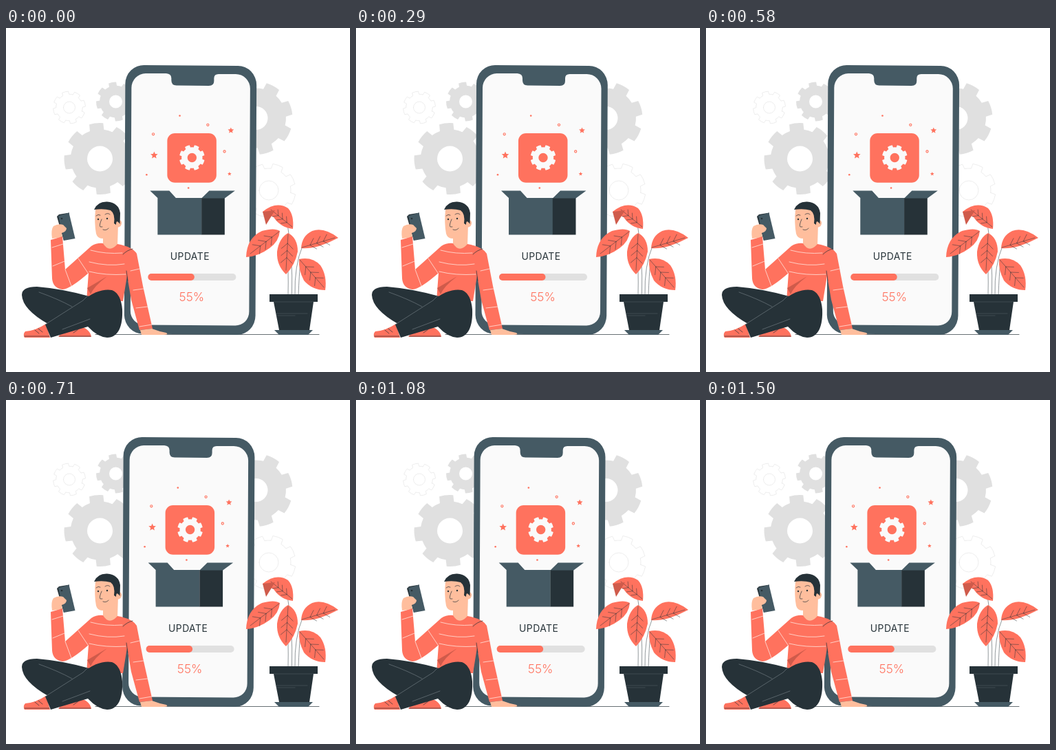
An HTML page that plays this animation: 500x500 px, repeating every 1.54 s.

```html
<!DOCTYPE html>
<html lang="en">
<head>
<meta charset="utf-8">
<title>Update</title>
<style>
  html, body { margin: 0; height: 100%; overflow: hidden; background: #fff; }
  svg { display: block; width: 100vw; height: 100vh; }
  path { stroke-linecap: round; stroke-linejoin: round; }
  text { font-family: Inter, "Open Sans", sans-serif; text-anchor: middle; }
  .coral { fill: #ff725e; }
  .slate { fill: #455a64; }
  .dark { fill: #263238; }
  .grey { fill: #e0e0e0; }
  .skin { fill: #ffbe9d; }
  .shade { fill: #cf5b4b; }
  .ink { fill: none; stroke: #263238; stroke-width: .7; }
  .pale { fill: none; stroke: #ffd8d0; stroke-width: .9; }
  .seam { fill: none; stroke: #8b959a; stroke-width: .5; }
  .stem { fill: none; stroke: #263238; stroke-width: .5; }
  .ring { fill: none; stroke: #ff725e; stroke-width: 1.1; }
  .faint { fill: none; stroke: #e6e6e6; stroke-width: .7; }
</style>
</head>
<body>
<svg viewBox="0 0 500 500">
  <g id="gears"></g>
  <path class="ink" d="M130 445.5H455"/>

  <g id="phone">
    <path class="slate" d="M201.500 54L337 55A27 28 0 0 1 364.300 83L362.700 418A27 28 0 0 1 336 446L199 444.500A27 28 0 0 1 172 417L173.500 81A27 27 0 0 1 201.500 54Z"/>
    <path fill="#fafafa" d="M203 66H233Q240.500 66.500 240.500 73V76Q240.500 83.500 248 83.500L295 84Q302.500 84 302.500 77V73Q302.500 67 309 67H334A21 21 0 0 1 355 88L353.500 412A20 20 0 0 1 333 432.500L201 431.500A20 20 0 0 1 181 411L182.500 87A21 21 0 0 1 203 66Z"/>
    <rect class="coral" x="234.500" y="153" width="71.500" height="71.700" rx="11"/>
    <g id="sparks"></g>
    <path class="slate" d="M220.500 247H284.500V300.500H220.500ZM209.500 236.500H237.500L247.500 247.500H221Z"/>
    <path class="dark" d="M284.300 247H318V300.500H284.300Z"/>
    <path class="slate" d="M295.500 236.500H333L318 247.500H284.300Z"/>
    <text class="dark" x="267.500" y="337" font-size="13.900" letter-spacing=".45">UPDATE</text>
    <rect class="grey" x="206.500" y="357" width="128" height="10" rx="5"/>
    <rect class="coral" x="206.500" y="357" width="67.500" height="10" rx="5"/>
    <text class="coral" x="270" y="397" font-size="17.500" font-weight="300">55%</text>
  </g>

  <g id="plant">
    <path class="stem" d="M410 388Q411 350 408 325M415.500 388Q417 330 409 285M420 388Q419 345 431 317M425 388Q426 360 428 338"/>
    <g id="leaves"></g>
    <path class="shade" d="M373 267L391 265L378 286Z"/>
    <path class="slate" d="M390 439H446L439 446H397Z"/>
    <path class="dark" d="M383 387H453V398H447L441 439H397L389 398H383Z"/>
    <path class="seam" d="M389 398H447M392 415H438M393 418H420" stroke-opacity=".5"/>
  </g>

  <g id="man">
    <path class="skin" d="M141 302L163 284L162 317Q152 328 141 315Z"/>
    <path class="skin" d="M130 264Q128 283 131 299Q133 306 140 306Q154 304 161 290Q169 289 168 282Q166 277 161 280L157 260H133Z"/>
    <path class="dark" d="M128 264Q133 252 147 252.500Q164 254 166 269L165.500 285Q160 277 160 286L157 284Q159 270 152 265Q142 262 128 264Z"/>
    <path class="ink" d="M139 278Q135 287 137 289L140 289M141 293Q146 295 149 291M131 273Q134 270 137 272M144 271Q148 268 151 271"/>
    <circle class="dark" cx="134" cy="278" r="1.200"/>
    <circle class="dark" cx="147" cy="277" r="1.200"/>

    <path class="dark" d="M74 274L77 271L92 268.500L84 309Z"/>
    <path class="slate" d="M76 273L91.500 268.500L100.500 306L84 309Z"/>
    <circle class="dark" cx="81" cy="277" r="1.300"/>
    <path class="skin" d="M67 306Q65 293 69 288Q76 284 83 286L88 291Q88 296 81 298L82 304Z"/>

    <path class="coral" d="M65 308L82 303L86 351L124 317Q132 312 141 313Q150 328 162 314Q184 318 190 328L199 375L213 437L194 439L182 395L176 360L170 397H117L120 356Q94 379 82 380Q68 378 67 364Z"/>
    <path class="shade" d="M147 361L118 378L123 387Q128 375 147 361Z"/>
    <path class="pale" d="M67 319L83 314M68 346L85 339M86 351L95 375M105 335L119 356M123 323Q145 329 169 327M121 340Q148 347 172 343M121 354Q145 360 174 358M181 353L194 350M185 381L200 379M189 407L206 405M194 434L212 431"/>
    <path class="ink" d="M170 329Q176 323 184 321M175 353L177 367"/>

    <path class="skin" d="M195 439L212 437Q222 441 233 443Q237 446 229 446H197Z"/>
    <path class="coral" d="M78 446L106 432L116 437Q123 442 124 449H76Z"/>
    <path class="coral" d="M58 430Q43 440 28 441Q24 445 27 450H64Z"/>
    <path class="ink" d="M27 448H63M78 448H123M42 439L48 444M47 437L53 442M105 438L98 443"/>
    <path class="dark" d="M23 388Q23 376 45 376Q82 379 121 390L114 412L120 432L100 430L61 430Q24 409 23 388Z"/>
    <path class="dark" d="M57 431L112 396Q134 378 154 381Q167 386 169 409C170 432 164 450 147 450Q133 449 119 434L65 450Z"/>
    <path class="seam" d="M48 384Q76 394 96 405M57 431L112 396L119 389M82 438L122 423"/>
  </g>
</svg>
<script>
const $ = id => document.getElementById(id);
const polar = (cx, cy, r, a) => `${(cx + r * Math.cos(a)).toFixed(2)} ${(cy + r * Math.sin(a)).toFixed(2)}`;
const disc = (x, y, r) => `M${x - r} ${y}a${r} ${r} 0 1 0 ${2 * r} 0a${r} ${r} 0 1 0 ${-2 * r} 0Z`;

function gear(cx, cy, r, hole, turn, attrs) {
  const step = Math.PI / 4, body = r * .82;
  const p = (radius, k) => polar(cx, cy, radius, turn * Math.PI / 180 + k * step);
  let d = `M${p(body, -.31)}`;
  for (let i = 0; i < 8; i++)
    d += `L${p(r, i - .25)}A${r} ${r} 0 0 1 ${p(r, i + .25)}L${p(body, i + .31)}A${body} ${body} 0 0 1 ${p(body, i + .69)}`;
  return `<path ${attrs} fill-rule="evenodd" d="${d}Z${disc(cx, cy, hole)}"/>`;
}

function star(cx, cy, r) {
  const points = Array.from({ length: 10 }, (_, i) => polar(cx, cy, i % 2 ? r * .45 : r, (i / 5 - .5) * Math.PI));
  return `<path class="coral" d="M${points.join('L')}Z"/>`;
}

// Leaf outline with a midrib from base to tip and paired side veins
function leaf(outline, x1, y1, x2, y2) {
  const dx = x2 - x1, dy = y2 - y1;
  let veins = `M${x1} ${y1}L${x2} ${y2}`;
  for (const f of [.25, .45, .65]) {
    const x = x1 + dx * f, y = y1 + dy * f;
    for (const side of [-.16, .16])
      veins += `M${x} ${y}L${x + dx * .15 - dy * side} ${y + dy * .15 + dx * side}`;
  }
  return `<path class="coral" d="${outline}"/><path class="stem" d="${veins}"/>`;
}

$('gears').innerHTML =
  gear(136.5, 190, 52, 18.5, 39, 'class="grey"') +
  gear(159.5, 107, 28.5, 9.5, 35, 'class="grey"') +
  gear(363.5, 131, 53, 17, 28, 'class="grey"') +
  gear(92, 115.5, 23.5, 8.5, 30, 'class="faint"') +
  gear(382, 236, 39, 14, 20, 'class="faint"');

$('sparks').innerHTML =
  gear(270.5, 188.5, 18.5, 6.7, 22.5, 'fill="#fafafa"') +
  star(215.5, 185, 5.6) + star(327, 149, 4.6) + star(325, 212, 3) +
  [[214.2, 154.3], [293.5, 140.8], [317.7, 179.5]].map(([x, y]) => `<circle class="ring" cx="${x}" cy="${y}" r="1.6"/>`).join('') +
  [[252.7, 127.5], [204.5, 213.3], [265.3, 232.5]].map(([x, y]) => `<circle class="coral" cx="${x}" cy="${y}" r="1.3"/>`).join('');

$('leaves').innerHTML =
  leaf('M373 267Q393 251 410 262Q419 272 417 292Q399 290 389 275Z', 416, 289, 385, 264) +
  leaf('M349 333Q350 305 372 295Q390 290 398 295Q397 310 383 320Q367 332 349 333Z', 397, 296, 355, 328) +
  leaf('M407 358Q393 345 394 325Q397 305 410 298Q424 305 424 325Q420 345 407 358Z', 410, 300, 407, 352) +
  leaf('M429 320Q430 302 445 295Q462 289 483 305Q470 312 455 317Q440 321 429 320Z', 430, 319, 478, 305) +
  leaf('M426 336Q445 332 457 345Q467 360 464 381Q445 381 433 367Q425 352 426 336Z', 427, 337, 462, 377);

// Horizontal shake: evenly spaced stops, stepped at 24 pictures per second
const stops = [0, -1, 2, -4, 4, -4, 4, -4, 2, -1, 0];

function draw() {
  const tick = Math.floor(performance.now() % 1540 * .024 + .1);
  const place = (tick + .5) / 36 % 1 * 10, i = Math.floor(place);
  const x = stops[i] + (stops[i + 1] - stops[i]) * (place - i);
  $('phone').setAttribute('transform', `translate(${x.toFixed(3)})`);
  requestAnimationFrame(draw);
}
draw();
</script>
</body>
</html>
```
